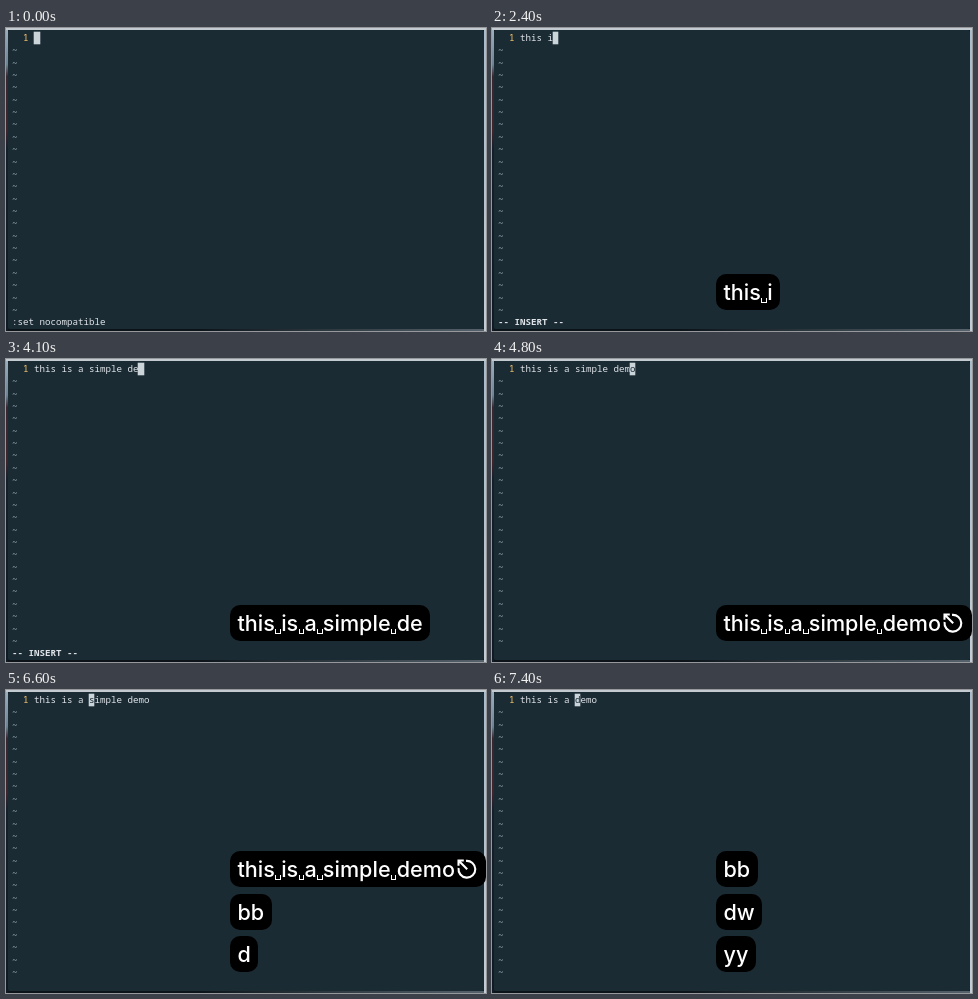
Write an HTML page that moves like this. It is 480 px wide and 303 px high and loops after 8000 ms.

```html
<!DOCTYPE html>
<html lang="en">
<head>
<meta charset="utf-8">
<title>Editor keystrokes</title>
<style>
  html, body { margin: 0; width: 100%; height: 100%; overflow: hidden; }
  #stage {
    position: relative; width: 480px; height: 303px; overflow: hidden;
    background:
      linear-gradient(#c3cbd0, #c3cbd0) 0 0 / 100% 2px no-repeat,
      linear-gradient(#9fb2c0, #6f8494 12%, #3a2630 16%, #42232b 34%, #141f2b 40%, #101a24) 0 0 / 2px 100% no-repeat,
      linear-gradient(#a9bccb, #b4c2cd 50%, #c3ccd4) 100% 0 / 2px 100% no-repeat,
      linear-gradient(90deg, #0c141a 40%, #56636c) 0 100% / 100% 2px no-repeat,
      #10181f;
  }
  #window { position: absolute; inset: 2px 2px 2px 1.5px; background: #1b2b34; border-radius: 2px; }
  .row {
    position: absolute; left: 6px; height: 12.4px; line-height: 12.4px; white-space: pre;
    font-family: "Noto Sans Mono", "DejaVu Sans Mono", monospace; font-size: 9.17px; color: #e0e5e9;
  }
  .tilde { color: #9db4c2; }
  .number { color: #fccb70; }
  #line { left: 28px; }
  #number { left: 17px; }
  .cursor {
    display: inline-block; height: 12.4px; vertical-align: top;
    background: #cad4d9; box-shadow: 0 0 0 .3px #cad4d9; color: #1b2b34;
  }
  .insert { font-weight: bold; }
  .pill {
    position: absolute; left: 224px; height: 36px; padding: 0 7.5px; border-radius: 10px;
    background: #000; color: #fff; white-space: pre;
    font: 500 21.6px/37.5px Inter, Roboto, sans-serif;
  }
  .space {
    display: inline-block; box-sizing: border-box; width: 5.6px; height: 4.5px; margin: 0 .3px;
    border: solid #fff; border-width: 0 1.5px 1.5px; vertical-align: -2.5px;
  }
  .pill svg { width: 23px; height: 22px; vertical-align: -3px; fill: none; stroke: #fff; stroke-width: 2.1; }
</style>
</head>
<body>
<div id="stage">
  <div id="window"></div>
  <div id="number" class="row number">1</div>
  <div id="line" class="row"></div>
  <div id="status" class="row"></div>
  <div id="pills"></div>
</div>
<script>
const LOOP = 8000, HOLD = 2000, FADE = 200;
const ROW = 12.37, PILL_BOTTOM = 246.2, PILL_STEP = 42.5;
const ESC = "\u238b";
const ESC_ICON = '<svg viewBox="0 0 23 22"><path d="M11 2.9A8.4 8.4 0 1 1 3.6 10M12.2 11.2 4 3M3.5 7.8V2.5H8.8"/></svg>';
const SENTENCE = "this is a simple demo";
const TYPED_AT = [1700, 1900, 2000, 2100, 2300, 2400, 2500, 2600, 2700, 2900,
  3200, 3400, 3400, 3500, 3700, 3700, 3800, 4000, 4100, 4200, 4300];

const $ = id => document.getElementById(id);

// Each group of keys shares one pill.
const groups = [
  { keys: "i", times: [100] },
  { keys: SENTENCE + ESC, times: [...TYPED_AT, 4700] },
  { keys: "bb", times: [5500, 6000] },
  { keys: "dw", times: [6600, 6800] },
  { keys: "yy", times: [7300, 7400] }
];

// The editor echoes the very first key slightly late.
const typing = TYPED_AT.map((time, i) => ({
  time: time + (i ? 0 : 100), text: SENTENCE.slice(0, i + 1), cursor: i + 1
}));
const edits = [
  { time: 0, text: "", cursor: 0 },
  ...typing,
  { time: 4800, text: SENTENCE, cursor: 20 },
  { time: 5600, text: SENTENCE, cursor: 17 },
  { time: 6100, text: SENTENCE, cursor: 10 },
  { time: 6900, text: "this is a demo", cursor: 10 }
];
const statuses = [
  { time: 0, text: ":set nocompatible" },
  { time: 200, text: "-- INSERT --" },
  { time: 4800, text: "" }
];

const latest = (list, t) => list.filter(item => item.time <= t).pop();

function placeRow(element, index) {
  element.style.top = 3.8 + index * ROW + "px";
}

function lineHtml({ text, cursor }) {
  return text.slice(0, cursor) +
    `<span class="cursor">${text[cursor] || " "}</span>` + text.slice(cursor + 1);
}

function pillHtml(keys) {
  return keys.replace(/ /g, '<span class="space"></span>').replace(ESC, ESC_ICON);
}

function setHtml(element, html) {
  if (element.source === html) return;
  element.source = html;
  element.innerHTML = html;
}

function drawPills(t) {
  let top = PILL_BOTTOM;
  for (const { element, keys, times } of [...groups].reverse()) {
    const count = times.filter(time => time <= t).length;
    const age = t - times[Math.max(0, count - 1)];
    const opacity = Math.max(0, Math.min(1, 1 - (age - HOLD) / FADE));
    const visible = count > 0 && opacity > 0;
    element.style.display = visible ? "block" : "none";
    if (!visible) continue;
    setHtml(element, pillHtml(keys.slice(0, count)));
    element.style.opacity = opacity;
    element.style.top = top + "px";
    top -= PILL_STEP;
  }
}

function draw() {
  const t = performance.now() % LOOP;
  const status = latest(statuses, t).text;
  setHtml($("line"), lineHtml(latest(edits, t)));
  setHtml($("status"), status);
  $("status").classList.toggle("insert", status.startsWith("--"));
  drawPills(t);
  requestAnimationFrame(draw);
}

for (let i = 1; i <= 22; i++) {
  const tilde = document.createElement("div");
  tilde.className = "row tilde";
  tilde.textContent = "~";
  placeRow(tilde, i);
  $("stage").insertBefore(tilde, $("pills"));
}
placeRow($("number"), 0);
placeRow($("line"), 0);
placeRow($("status"), 23);
for (const group of groups) {
  group.element = document.createElement("div");
  group.element.className = "pill";
  $("pills").append(group.element);
}
draw();
</script>
</body>
</html>
```
